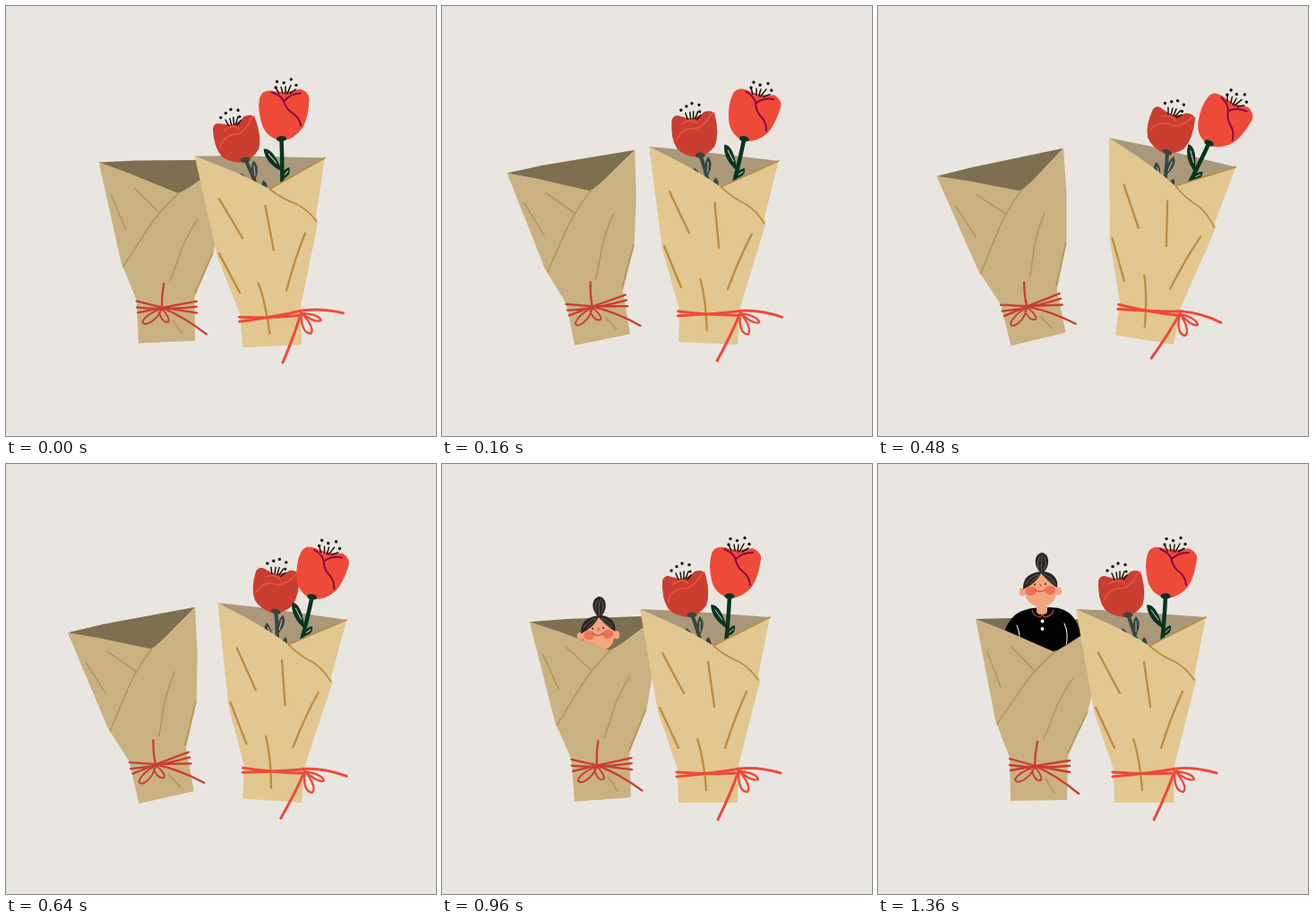
Write an HTML page that moves like this. It is 480x480 px and loops after 2 s.

```html
<!DOCTYPE html>
<html lang="en">
<head>
<meta charset="utf-8">
<title>Bouquets</title>
<style>
  html, body { margin: 0; height: 100%; overflow: hidden; background: #e9e6e1; }
  svg { display: block; width: 100%; height: 100%; }
  .line { fill: none; stroke-linecap: round; stroke-linejoin: round; }
</style>
</head>
<body>
<svg viewBox="0 0 480 480">
  <clipPath id="opening"><path d="M109 173L140 185Q172 199 197 210L254 174V0H0V173Z"/></clipPath>

  <g id="leftWrap">
    <path fill="#7e6f50" d="M109 173L150 172L254 174L197 212Z"/>
    <g clip-path="url(#opening)">
      <g id="girl">
        <path fill="#030303" d="M161 164Q172 159 183 161Q197 158 208 163Q220 169 225 184L230 225H140V190Q147 169 161 164Z"/>
        <path fill="#f2a37b" d="M177 152H189V164Q189 168 183 168Q177 168 177 164Z"/>
        <path class="line" stroke="#b8503b" stroke-width="1.2" d="M172 163Q173 170 181 171L183 168L186 171Q194 170 196 163"/>
        <path class="line" stroke="#e9e6e1" stroke-width="1.1" d="M155 180Q159 190 158 202M208 178Q213 189 210 203"/>
        <g fill="#fff"><circle cx="183.5" cy="175.500" r="1.900"/><circle cx="183.500" cy="184" r="1.900"/></g>
        <g fill="#f4a57d">
          <ellipse cx="161" cy="143" rx="3.500" ry="4.500"/>
          <ellipse cx="201.500" cy="142" rx="3.500" ry="4.500"/>
          <path d="M163 136Q165 123 181 123Q197 123 199 136Q201 159 182 159Q163 159 163 136Z"/>
        </g>
        <g fill="#ef5544" opacity=".65">
          <ellipse cx="171" cy="142" rx="6" ry="5"/><ellipse cx="192" cy="141" rx="6" ry="5"/>
        </g>
        <g fill="#2b2523">
          <path d="M182 122C172 113 175 100 183 99C191 100 193 112 185 121Z"/>
          <path d="M162 140Q161 125 176 121Q183 119 190 121Q202 126 200 138Q190 132 182 122Q177 133 162 140Z"/>
          <circle cx="175" cy="134.500" r="1"/><circle cx="187" cy="134" r="1"/>
        </g>
        <path class="line" stroke="#8b817a" stroke-width=".6" d="M180 121Q176 111 181 103M183 120Q181 110 184 102M185 118Q189 110 186 104M165 134Q169 126 179 123M169 134Q176 128 180 124M185 123Q194 126 198 134M185 125Q190 130 195 133"/>
        <path class="line" stroke="#b6402d" stroke-width="1" d="M181 134Q183 136 181 137M175 140Q181 145 187 140"/>
      </g>
    </g>
    <path fill="#cab182" d="M109 173L140 185Q172 199 197 210Q224 196 254 174L246 225L234 278L212 326L211 375L148 376L147 328L131 286Z"/>
    <g class="line" stroke="#b3985c" stroke-width="1.700">
      <path d="M122 210L137 249M148 203L174 230M198 209Q175 229 162 248T133 290M217 240Q203 260 196 279T185 307M233 278L212 322M187 351L197 367"/>
    </g>
    <g class="line" stroke="#c93d30" stroke-width="2.300">
      <path d="M147 329L176 337L214 344M147 336Q174 340 214 337M148 342L176 337L214 331M178 310Q175 323 175 337Q200 348 224 368"/>
      <path stroke-width="1.900" d="M175 338Q157 344 153 352Q154 357 162 353Q171 348 175 338Q184 349 182 353Q175 355 172 342"/>
    </g>
  </g>

  <g id="rightWrap">
    <path fill="#aa987b" d="M221 162L270 164L366 171L303 206Z"/>
    <g id="smallFlower">
      <g class="line" stroke="#38463e">
        <path stroke-width="4" d="M279 168Q284 181 291 206"/>
        <path stroke-width="1.500" fill="#38463e" d="M288 190Q283 178 288 171Q294 178 288 190ZM282 199Q280 189 273 184Q269 191 282 199ZM298 207Q293 199 297 194Q302 199 298 207Z"/>
        <path stroke="#cfc6b4" stroke-width=".9" d="M288 187V176M279 193L275 188"/>
      </g>
      <path fill="#c93e30" d="M246 130Q249 123 256 126L265 128Q276 127 282 120Q291 117 294 123Q300 144 295 158Q287 169 275 171Q261 170 253 162Q245 151 246 130Z"/>
      <path class="line" stroke="#ed503d" stroke-width="1.700" d="M252 153Q256 141 267 139Q279 141 288 126Q289 122 293 121M258 134Q267 127 275 133"/>
      <ellipse cx="279" cy="168.500" rx="5.500" ry="3" fill="#38463e"/>
      <path class="line" stroke="#161412" stroke-width="1.500" d="M264 129L261 122M267 128L266 121M270 128V120M272 128L275 120M274 129L278 124"/>
      <g fill="#161412">
        <circle cx="256" cy="119" r="1.700"/><circle cx="262" cy="114.500" r="1.700"/><circle cx="268" cy="111" r="1.700"/>
        <circle cx="276" cy="112.500" r="1.700"/><circle cx="277" cy="120" r="1.600"/>
      </g>
    </g>
    <g id="bigFlower">
      <g class="line" stroke="#07351f">
        <path stroke-width="4.500" d="M321 147Q320 170 317 200"/>
        <path stroke-width="1.800" fill="#07351f" d="M317 182Q302 172 301 158Q310 158 317 182ZM318 192Q320 183 326 181Q328 188 318 192Z"/>
        <path stroke="#d8d3c4" stroke-width="1" d="M313 174L305 163M321 188L325 184"/>
      </g>
      <path fill="#ef4a38" d="M301 100Q304 91 315 93Q330 98 347 94Q357 99 356 106Q353 127 346 137Q336 149 322 150Q305 146 301 130Q297 113 301 100Z"/>
      <path class="line" stroke="#850a48" stroke-width="2" d="M315 95Q327 100 328 108Q330 116 337 121Q343 126 344 135M328 106Q336 98 347 99"/>
      <ellipse cx="321" cy="147.500" rx="5.500" ry="3.200" fill="#07351f"/>
      <path class="line" stroke="#161412" stroke-width="1.500" d="M323 97L320 90M327 97L326 90M330 98L331 90M332 98L337 89M335 98L342 94"/>
      <g fill="#161412">
        <circle cx="320" cy="90" r="1.700"/><circle cx="322" cy="83.500" r="1.700"/><circle cx="329.500" cy="85.500" r="1.700"/>
        <circle cx="338" cy="82.500" r="1.700"/><circle cx="343" cy="89.500" r="1.700"/>
      </g>
    </g>
    <path fill="#e2c790" d="M221 162L255 177Q281 189 303 203Q335 187 366 171L353 236L355 242L346 277L331 336L330 378L264 378L263 341L241 276Z"/>
    <g class="line" stroke="#bd8b41" stroke-width="2.300">
      <path d="M246 211L270 256M297 221L304 271M340 254Q327 282 316 317M243 272L264 317M285 307Q292 328 295 364"/>
      <path stroke-width="1.700" d="M366 171L303 203Q317 215 332 221Q344 228 353 241"/>
    </g>
    <g class="line" stroke="#ee4a38" stroke-width="3">
      <path d="M262 344Q300 347 332 345M262 349Q305 345 332 340Q354 338 378 345M331 343Q323 366 308 397"/>
      <path stroke-width="2.400" d="M332 343Q351 345 353 352Q346 355 332 343Q346 360 341 366Q331 366 331 345"/>
    </g>
  </g>
</svg>
<script>
const LOOP = 2000, STEP = 40;

// Smooth curve through [time, value] keys, held flat after the last one.
function track(...keys) {
  const last = keys.length - 1;
  const slope = i => {
    if (i === last) return 0;
    const [t0, v0] = keys[Math.max(i - 1, 0)], [t1, v1] = keys[i + 1];
    return (v1 - v0) / (t1 - t0);
  };
  return t => {
    if (t >= keys[last][0]) return keys[last][1];
    if (t <= keys[0][0]) return keys[0][1];
    const i = keys.findIndex(k => k[0] > t) - 1;
    const [t0, v0] = keys[i], [t1, v1] = keys[i + 1];
    const d = t1 - t0, u = (t - t0) / d, w = 1 - u;
    return w * w * ((1 + 2 * u) * v0 + u * d * slope(i))
         + u * u * ((1 + 2 * w) * v1 - w * d * slope(i + 1));
  };
}

const leftSwing = track([0, -1.5], [160, -10.6], [320, -12.4], [440, -12.9], [640, -11.7], [800, -8.6], [960, -3.2], [1100, 0]);
const rightSwing = track([0, -2.8], [160, 2.7], [320, 9.6], [400, 10.9], [560, 7.2], [640, 4], [800, 0], [880, 0]);
const bigSway = track([0, -2.5], [160, 6], [320, 13.4], [400, 14.7], [560, 9], [640, 5], [800, 0.3], [880, 0]);
const smallSway = track([0, -2.5], [160, -1], [320, 6], [480, 13], [640, 11], [800, 3.7], [960, 0]);
const girlDrop = track([0, 130], [700, 130], [800, 104], [960, 50], [1120, 1], [1200, -7.5], [1280, -4], [1360, 0]);
const girlTilt = track([0, 1], [800, 1], [1120, 3.5], [1240, 1.5], [1360, 0]);

const pose = (id, transform) => document.getElementById(id).setAttribute("transform", transform);

function draw(now) {
  const t = Math.floor((now % LOOP) / STEP) * STEP;
  pose("leftWrap", `rotate(${leftSwing(t)} 163 376)`);
  pose("rightWrap", `rotate(${rightSwing(t)} 330 378)`);
  pose("bigFlower", `rotate(${bigSway(t)} 317 200)`);
  pose("smallFlower", `rotate(${smallSway(t)} 289 206)`);
  pose("girl", `translate(0 ${girlDrop(t)}) rotate(${girlTilt(t)} 183 230)`);
}

let start;
function frame(now) {
  start ??= now;
  draw(now - start);
  requestAnimationFrame(frame);
}
draw(0);
requestAnimationFrame(frame);
</script>
</body>
</html>
```
